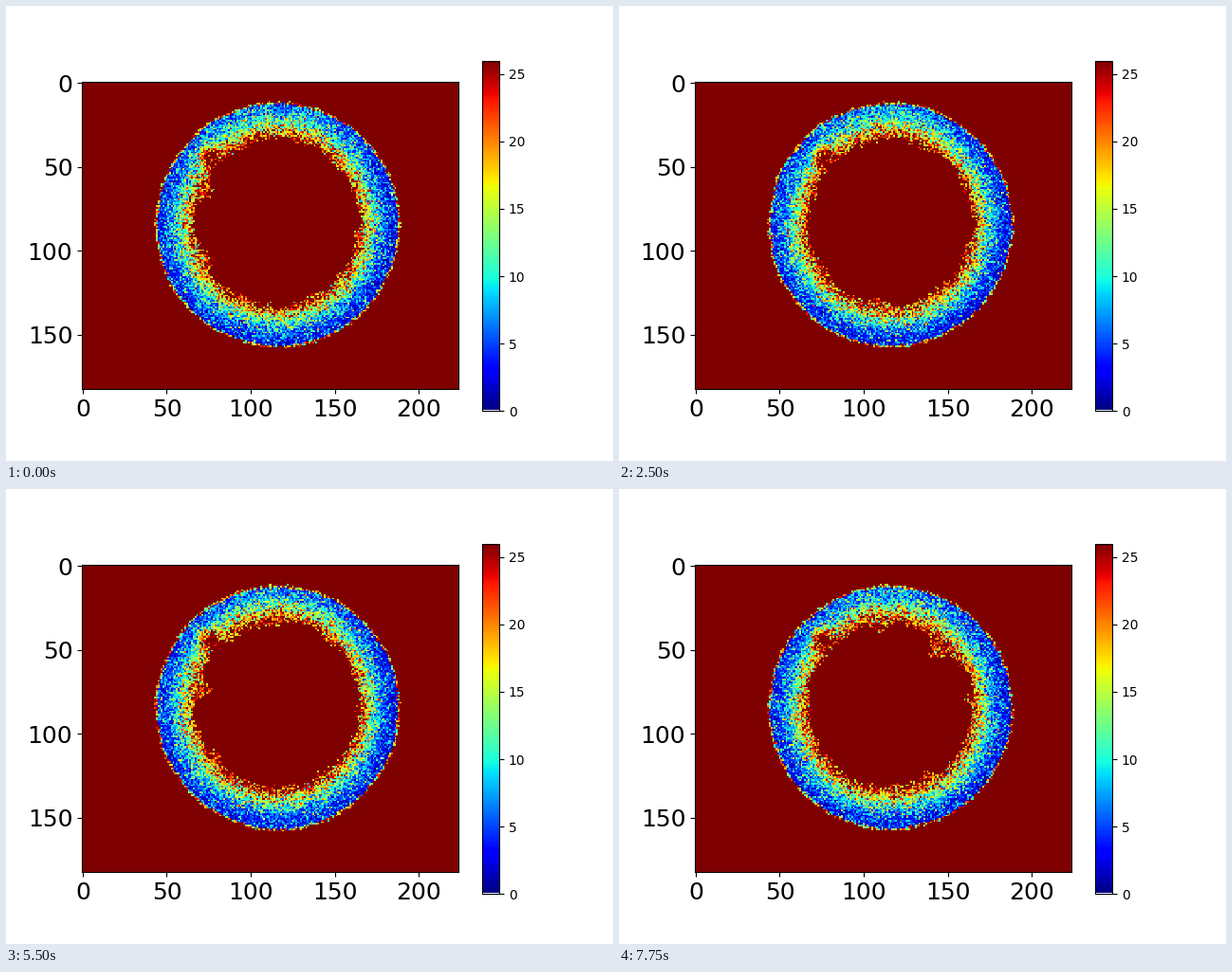
A matplotlib script that plays this animation: 640x480 px, repeating every 8000 ms.

```python
import numpy as np
import matplotlib.pyplot as plt
from matplotlib.animation import FuncAnimation
from matplotlib.colors import ListedColormap

ROWS, COLS = 183, 224
VMAX = 26
FRAMES, INTERVAL = 32, 250
CX, CY, RADIUS = 116, 85, 72.6
SPUR_ANGLES = np.radians([-100, -53, 0, 50, 90, 145, 195])

y, x = np.mgrid[:ROWS, :COLS]
r = np.hypot(x - CX, y - CY)
theta = np.arctan2(y - CY, x - CX)
top = np.clip(-np.sin(theta), 0, 1) ** 3
depth = np.clip(RADIUS - 1 - r + 2 * top, 0, None)
spot = np.exp(-((x - 75.5) ** 2 + (y - 44.5) ** 2) / 28)

# Mean value: low at the rim, rising towards the centre
mean = 4.2 - 0.5 * np.cos(theta) + 0.042 * depth ** 2 + 2.5 * top
mean = np.minimum(mean, 26) + 22 * spot
spread = 2.2 + 0.2 * mean
shape = (mean / spread) ** 2


def wobble(rng, amp):
    """Smooth random function of the angle."""
    total = np.zeros_like(r)
    for k in range(2, 15):
        total += rng.normal(0, amp) * np.cos(k * theta + rng.uniform(0, 2 * np.pi))
    return total


def inner_edge(rng):
    """Ragged edge of the hole, with spurs that reach inwards."""
    edge = 49 - 1.8 * np.sin(theta) + wobble(rng, 0.35)
    for angle in SPUR_ANGLES + rng.normal(0, 0.1, len(SPUR_ANGLES)):
        reach = min(rng.exponential(4), 13)
        width = np.radians(3 + 0.4 * reach)
        gap = np.angle(np.exp(1j * (theta - angle)))
        edge -= reach * np.exp(-(gap / width) ** 2)
    return edge + rng.normal(0, 0.9, r.shape)


def field(i):
    rng = np.random.default_rng(100 + i)
    z = rng.gamma(shape, mean / shape)
    rim = RADIUS + wobble(rng, 0.08) + rng.normal(0, 0.3, r.shape)
    fringe = r > rim - 0.9
    z[fringe] = rng.uniform(10, 32, r.shape)[fringe]
    z[(r > rim + 0.3) | (r < inner_edge(rng))] = VMAX
    return z


colors = plt.get_cmap("jet")(np.arange(256))
colors[0] = 1
fig, ax = plt.subplots(figsize=(6.4, 4.8), dpi=100)
image = ax.imshow(field(0), cmap=ListedColormap(colors), vmin=0, vmax=VMAX,
                  interpolation="nearest")
ax.set_xticks(range(0, 201, 50))
ax.set_yticks(range(0, 151, 50))
ax.tick_params(labelsize=18)
fig.colorbar(image, ax=ax, ticks=range(0, 26, 5))


def update(i):
    image.set_data(field(i))
    return [image]


anim = FuncAnimation(fig, update, frames=FRAMES, interval=INTERVAL,
                     repeat=True, repeat_delay=0)
plt.show()
```
